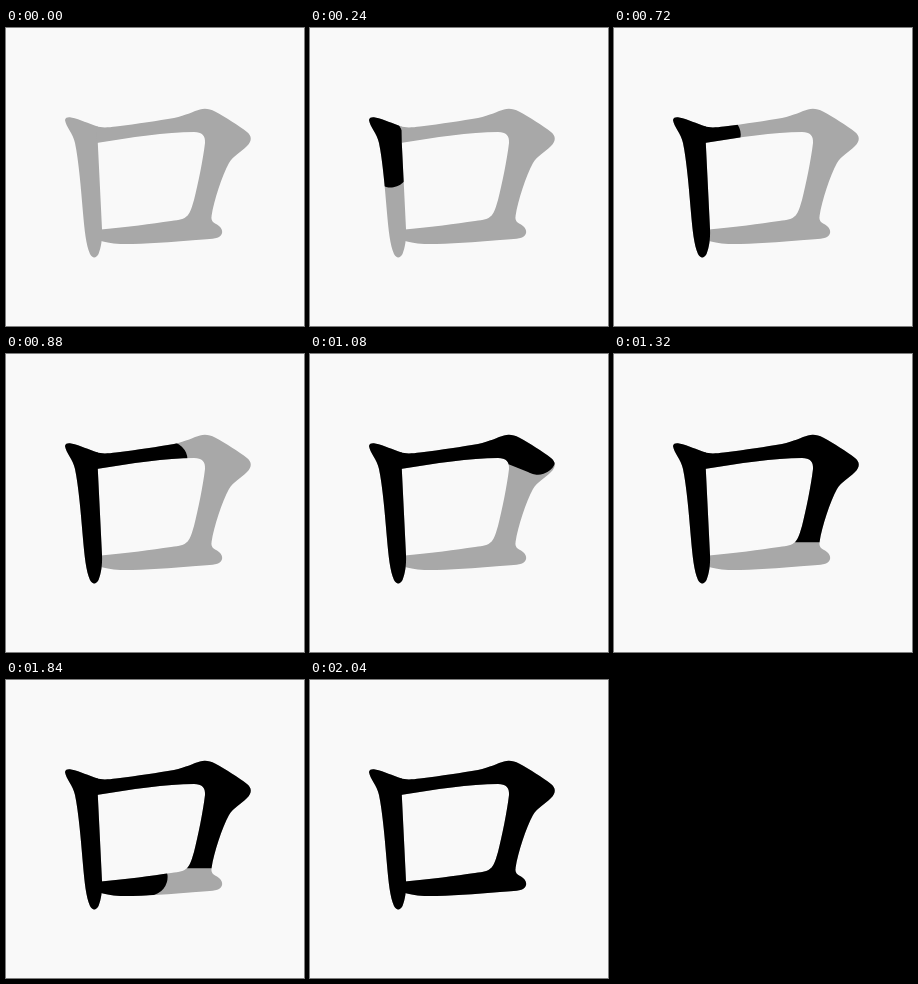
These frames come from a looping animation (298x298 px, 3000 ms). An HTML page:

```html
<!DOCTYPE html>
<html lang="en">
<head>
<meta charset="utf-8">
<title>Stroke order</title>
<style>
  html, body { margin: 0; width: 100%; height: 100%; overflow: hidden; background: #f9f9f9; }
  svg { display: block; width: 100vw; height: 100vh; }

  .outline { fill: #a8a8a8; }

  /* A round brush follows each stroke's centre line, clipped to its outline. */
  .brush {
    fill: none;
    stroke: #000;
    stroke-linecap: round;
    stroke-linejoin: round;
    stroke-dasharray: 100 300;
    animation: 3s infinite;
  }
  .left   { animation-name: left; }
  .corner { animation-name: corner; }
  .base   { animation-name: base; }

  /* Each brush moves in 40 ms steps; the last one widens it to fill the outline. */
  @keyframes left {
    0%           { opacity: 0; stroke-width: 37.2px; stroke-dashoffset: 95; animation-timing-function: step-end; }
    3.99%        { opacity: 1; stroke-dashoffset: 95; animation-timing-function: steps(8); }
    14.66%, 100% { opacity: 1; stroke-width: 300px; stroke-dashoffset: 0; }
  }
  @keyframes corner {
    0%           { opacity: 0; stroke-width: 37.2px; stroke-dashoffset: 95.5; animation-timing-function: step-end; }
    23.99%       { opacity: 1; stroke-dashoffset: 95.5; animation-timing-function: steps(4); }
    29.32%       { stroke-dashoffset: 71.2; animation-timing-function: steps(5); }
    35.99%       { stroke-dashoffset: 39.7; animation-timing-function: steps(4); }
    41.32%       { stroke-dashoffset: 9.5; animation-timing-function: steps(2); }
    43.99%, 100% { opacity: 1; stroke-width: 300px; stroke-dashoffset: 0; }
  }
  @keyframes base {
    0%           { opacity: 0; stroke-width: 37.2px; stroke-dashoffset: 97; animation-timing-function: step-end; }
    55.99%       { opacity: 1; stroke-dashoffset: 97; animation-timing-function: steps(4); }
    61.32%       { stroke-dashoffset: 56.5; animation-timing-function: step-end; }
    62.65%       { stroke-dashoffset: 56.5; animation-timing-function: steps(4); }
    67.99%, 100% { opacity: 1; stroke-width: 300px; stroke-dashoffset: 0; }
  }
</style>
</head>
<body>
<svg viewBox="0 0 298 298">
  <defs>
    <path id="left" d="M59 92 C59.500 89.500 62 89 65 89.500 C75 91.500 82 95.500 91.500 98.500
      L91.800 115 L96 201 C96.500 211 95 220 92.500 226 C90 230.500 86.500 230.500 84 226
      C80 217 78.500 202 77 185 C75 160 72.500 132 69 115 C67 105 60 99 59 92 Z"/>
    <path id="corner" d="M90.500 98 C95 100 102 99.500 110 98.500 C132 96 152 92.500 168 90
      C180 87.500 188 83 194 81.500 C199 80 204 81 209 83.500 C220 89.500 232 97 241 104
      C246 108 246 113 241 118 C235 124 227 128 223 135 C216 148 208 172 205.500 188.300
      L181 188.300 C185 184 186 178 188 172 C192 156 197 132 199 115
      C199.500 107 196 104.500 188 104 C160 104 125 109.500 90.500 115 Z"/>
    <path id="base" d="M95 201.500 C122 199 145 196 165 193 C174 192 178 191 181 188
      L205.500 188 C205 193 207 194.500 211 196.500 C217 200 218 206 213 209
      C209 211 200 211.500 190 212 C165 214 140 216 118 216 C108 216 100 214.500 95 213 Z"/>
    <clipPath id="left-clip"><use href="#left"/></clipPath>
    <clipPath id="corner-clip"><use href="#corner"/></clipPath>
    <clipPath id="base-clip"><use href="#base"/></clipPath>
  </defs>

  <g class="outline">
    <use href="#left"/>
    <use href="#corner"/>
    <use href="#base"/>
  </g>

  <g clip-path="url(#left-clip)">
    <path class="brush left" pathLength="100" d="M66 95 L76 112 L82 150 L88 212"/>
  </g>
  <g clip-path="url(#corner-clip)">
    <path class="brush corner" pathLength="100" d="M98 107 L163 106 L198 90 L213 96 L228 102 L212 133 L203 165 L195 185"/>
  </g>
  <g clip-path="url(#base-clip)">
    <path class="brush base" pathLength="100" d="M97 202 L143 197 L203 200"/>
  </g>
</svg>
</body>
</html>
```
